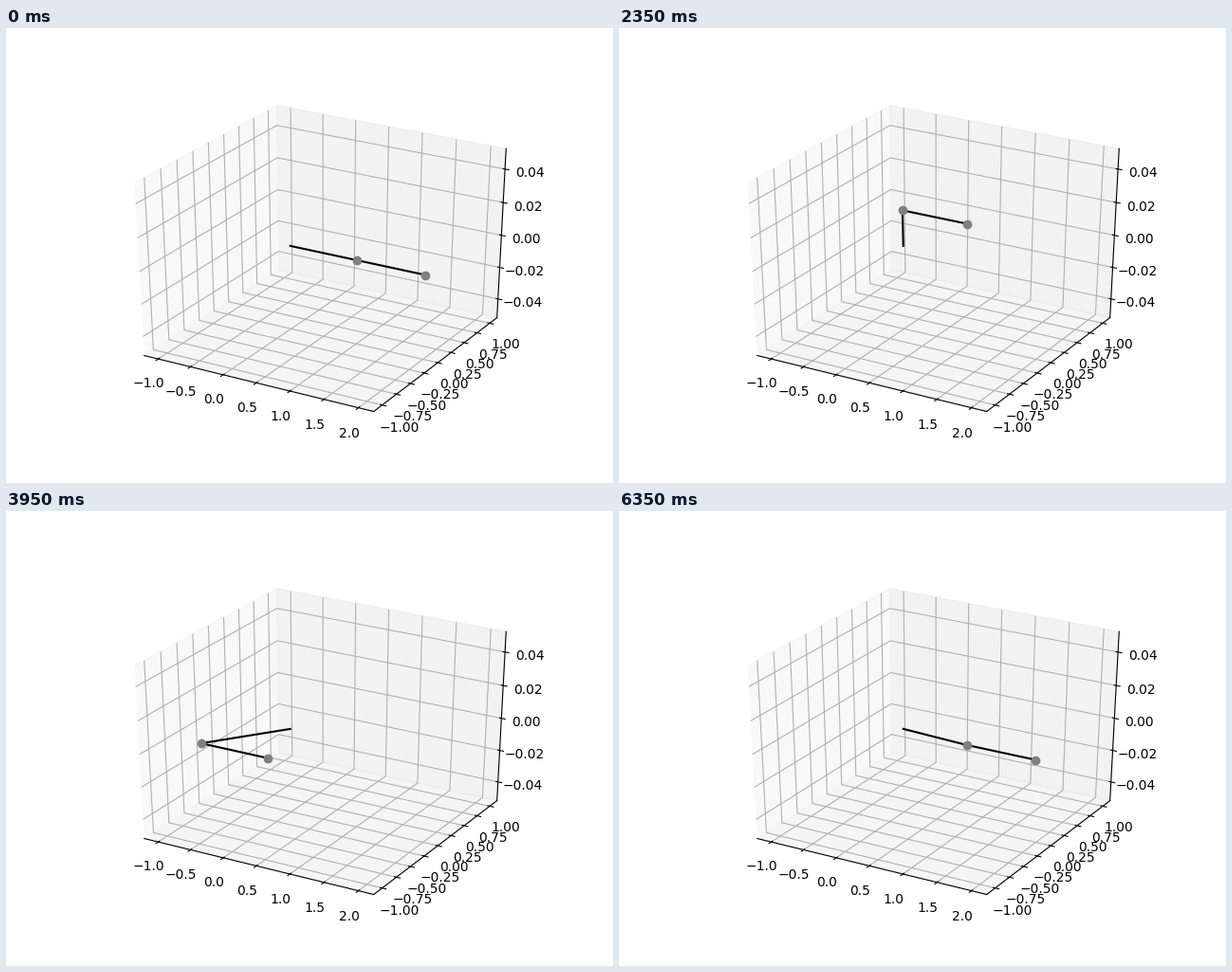
Animation of 640x480 px, one loop 6.4 s. Source, as a matplotlib script:

```python
import numpy as np
import matplotlib.pyplot as plt
from matplotlib.animation import FuncAnimation

FRAMES = 128
INTERVAL = 50  # ms


def padded(lo, hi):
    """Widen a data range by 1/48 on both sides, so panes reach past it."""
    pad = (hi - lo) / 48
    return lo - pad, hi + pad


fig = plt.figure(figsize=(6.4, 4.8), dpi=100)
ax = fig.add_subplot(projection="3d")

# Fill the whole subplot instead of shrinking to a square.
ax.apply_aspect = lambda position=None: None
# A cube whose edge is 25/24 world units.
ax.set_box_aspect((1, 1, 1), zoom=np.sqrt(3) / 1.8294640721620434)

arm, = ax.plot([0, 1, 2], [0, 0, 0], [0, 0, 0], color="black", marker="o",
               markevery=[1, 2], mfc="gray", mec="gray")

ax.set(xlim=padded(-1.15, 2.15), ylim=padded(-1.1, 1.1),
       zlim=padded(-0.05, 0.05))
ax.set_xticks(np.linspace(-1, 2, 7))
ax.set_yticks(np.linspace(-1, 1, 9))
ax.set_zticks(np.linspace(-0.04, 0.04, 5))


def update(i):
    angle = 2 * np.pi * i / FRAMES
    x, y = np.cos(angle), np.sin(angle)
    arm.set_data_3d([0, x, x + 1], [0, y, y], [0, 0, 0])
    return arm,


anim = FuncAnimation(fig, update, frames=FRAMES, interval=INTERVAL,
                     repeat=True, repeat_delay=0)
plt.show()
```
